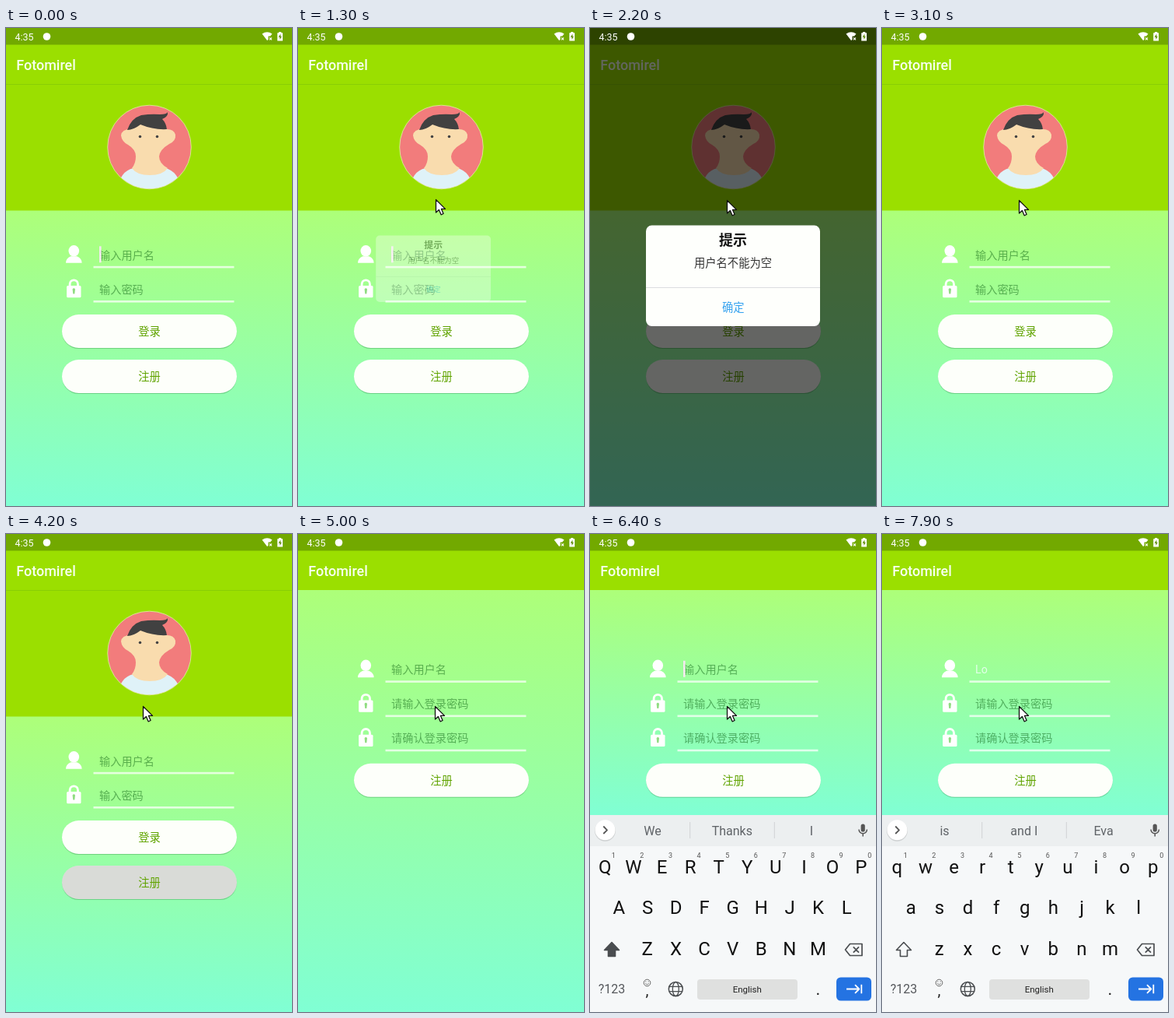
Recreate the animation shown at these times as an HTML page. Size 368 by 614 pixels, loop 8 s.

```html
<!DOCTYPE html>
<html lang="zh-CN">
<head>
<meta charset="utf-8">
<title>登录与注册</title>
<style>
  html, body { margin: 0; width: 100%; height: 100%; overflow: hidden; background: #9bdf00; }
  svg { display: block; width: 368px; height: 614px; }
  text { font-family: Roboto, "Noto Sans CJK SC", "Noto Sans CJK", sans-serif; }
  .hint { font-size: 14.2px; font-weight: 300; fill: #005208; opacity: .46; }
  .action { font-size: 14.3px; font-weight: 500; fill: #60a400; text-anchor: middle; }
  .mid { text-anchor: middle; }
  .key { font-size: 24px; fill: #111; text-anchor: middle; }
  .digit { font-size: 9px; fill: #555; text-anchor: middle; }
  .word { font-size: 16px; fill: #5f6367; text-anchor: middle; }
</style>
</head>
<body>
<svg id="stage" viewBox="0 0 368 614"></svg>
<script>
const LOOP = 8000, STEP = 100;
const ROWS = ["qwertyuiop", "asdfghjkl", "zxcvbnm"];
const ROW_X = [19.3, 37.4, 73.8], ROW_Y = [435.5, 488.3, 541], KEY_STEP = 36.6;

const text = (x, y, s, attrs = "") => `<text x="${x}" y="${y}" ${attrs}>${s}</text>`;
const rect = (x, y, w, h, fill, attrs = "") =>
  `<rect x="${x}" y="${y}" width="${w}" height="${h}" fill="${fill}" ${attrs}/>`;
const line = (d, color, width = 1.6) =>
  `<path d="${d}" fill="none" stroke="${color}" stroke-width="${width}" stroke-linejoin="round"/>`;

const userIcon = `<g fill="#fff"><ellipse cx="0" cy="-4.5" rx="6.8" ry="7.2"/>
  <path d="M-10.3 11Q-10.3 5-4 2.4H4Q10.3 5 10.3 11Z"/></g>`;
const lockIcon = `<path d="M-5.2-3V-6A5.2 5.2 0 0 1 5.2-6V-3" fill="none" stroke="#fff" stroke-width="2.8"/>
  ${rect(-9.2, -4, 18.4, 15.2, "#fff", 'rx="1.5"')}
  <path d="M-1.6 1.5A1.7 1.7 0 1 1 1.6 1.5L1 6.5H-1Z" fill="#8fdc80"/>`;

const field = (y, icon, hint, id) => `
  <g transform="translate(87.3 ${y - .5})">${icon}</g>
  ${text(120, y + 5.2, hint, `class="hint" id="${id}Hint"`)}
  ${rect(112.5, y + 14.5, 181, 2.6, "#fff", 'opacity=".72"')}
  ${rect(120, y - 11, 2.6, 21, "#f3e9ee", `id="${id}Caret"`)}`;

const button = (y, label, id = "") => `
  ${rect(72.3, y - 20, 224.5, 42.5, "#2f8a40", 'rx="21" opacity=".38"')}
  ${rect(72, y - 21.5, 225, 43, "#fdfffa", 'rx="21.5"')}
  ${id && rect(72, y - 21.5, 225, 43, "#000", `rx="21.5" opacity="0" id="${id}"`)}
  ${text(184.5, y + 5.2, label, 'class="action"')}`;

const avatar = `<clipPath id="disc"><circle cx="184.5" cy="153" r="53.5"/></clipPath>
  <g clip-path="url(#disc)">
    ${rect(130, 98, 110, 110, "#f27c7c")}
    <path d="M144 208Q146 184 164 180H205Q222 184 226 208Z" fill="#dff2f8"/>
    <path d="M160 130Q149 130 148 138Q149 146 157 150Q167 156 167 165Q167 174 162 180Q168 189 185 189
      Q202 189 208 180Q197 174 197 165Q198 156 210 149Q219 145 218 137Q216 130 207 130Q201 118 183 118Q166 118 160 130Z" fill="#f9dcae"/>
    <path d="M156 131Q161 116 174 112Q187 110 198 111Q207 111 208 108Q209 114 201 117Q206 122 207 130Q190 131 173 124Q164 131 156 131Z" fill="#414141"/>
    <circle cx="172.5" cy="139.5" r="1.8" fill="#444"/><circle cx="194.5" cy="139.5" r="1.8" fill="#444"/>
  </g><circle cx="184.5" cy="153" r="53.8" fill="none" stroke="#e8f4b8" stroke-width=".9" opacity=".8"/>`;

const statusItems = `
  ${text(11.5, 15.7, "4:35", 'font-size="12.4" fill="#fff"')}
  <circle cx="52.5" cy="11" r="4.8" fill="#fff"/>
  <path d="M329.5 7.5Q336 3 342.5 7.5L340 10.5H337.5V15L336 16Z" fill="#fff"/>
  ${line("M339 12.3L342 15.3M342 12.3L339 15.3", "#fff", 1.1)}
  <path d="M349.2 6.2H351V5H354.2V6.2H356V16.6H349.2Z" fill="#fff"/>
  <path d="M353.4 7.6L350.6 11.8H352.4V15L354.8 10.8H353.2Z" fill="#5a8a00"/>`;

const dialog = `
  ${rect(72, 253.5, 224, 129.5, "#fefffc", 'rx="7.5"')}
  ${text(184, 279, "提示", 'class="mid" font-size="18" font-weight="700" fill="#111"')}
  ${text(184, 307.3, "用户名不能为空", 'class="mid" font-size="14.3" fill="#333"')}
  ${rect(72, 333, 224, 1, "#dcdde0")}
  ${text(184.3, 363.5, "确定", 'class="mid" font-size="14.3" fill="#35a2ef"')}`;

const keys = ROWS.map((row, r) => [...row].map((c, i) => {
  const x = ROW_X[r] + i * KEY_STEP;
  return text(x, ROW_Y[r], c, 'class="key letter"') +
    (r ? "" : text(x + 11, 416, (i + 1) % 10, 'class="digit"'));
}).join("")).join("");

const keyboard = `
  ${rect(0, 361, 368, 253, "#f6f8f9")}${rect(0, 361, 368, 40, "#eceff0")}
  <circle cx="19.5" cy="381.3" r="13.4" fill="#000" opacity=".13"/>
  <circle cx="19.5" cy="380.3" r="13" fill="#fff"/>
  ${line("M17.3 375.5L22 380.3 17.3 385", "#555", 1.8)}
  ${rect(128.2, 370, 1, 21, "#cfd2d4")}${rect(236.8, 370, 1, 21, "#cfd2d4")}
  <g id="words">${[80.5, 182.8, 285].map(x => text(x, 386.6, "", 'class="word"')).join("")}</g>
  ${rect(348.6, 372.5, 5.2, 10, "#555", 'rx="2.6"')}
  ${line("M346 379.5A5.2 5.2 0 0 0 356.4 379.5M351.2 385V388.5", "#555", 1.5)}
  ${keys}
  <path id="shift" d="M28 524.5L37.5 534.5H32.5V542.5H23.5V534.5H18.5Z" stroke="#4a4d50" stroke-width="1.6" stroke-linejoin="round"/>
  ${line("M328.5 534L334.5 526.5H350V541.5H334.5ZM338.8 530.3L346 537.7M346 530.3L338.8 537.7", "#4a4d50", 1.7)}
  ${text(28, 590, "?123", 'class="mid" font-size="16" fill="#55585c"')}
  <circle cx="73.5" cy="576.5" r="4.3" fill="none" stroke="#666"/>
  ${line("M71.2 577.5Q73.5 580 75.8 577.5M71.8 574.3V575.6M75.2 574.3V575.6", "#666", .9)}
  ${text(73.5, 593, ",", 'class="mid" font-size="20" fill="#222"')}
  <circle cx="110.3" cy="584.5" r="9" fill="none" stroke="#4a4d50" stroke-width="1.5"/>
  <ellipse cx="110.3" cy="584.5" rx="4" ry="9" fill="none" stroke="#4a4d50" stroke-width="1.3"/>
  ${line("M102 581.3H118.6M102 587.7H118.6", "#4a4d50", 1.3)}
  ${rect(138, 572, 129, 26, "#dfe0df", 'rx="4"')}
  ${text(202.3, 589.3, "English", 'class="mid" font-size="11.5" fill="#222"')}
  ${text(293.5, 592, ".", 'class="mid" font-size="22" fill="#222"')}
  ${rect(317, 569.5, 45, 30, "#2473e2", 'rx="5.5"')}
  ${line("M330 584.5H346M341 579.2L346.3 584.5 341 589.8M349.3 578.7V590.2", "#fff", 1.8)}
  <g id="popup">${rect(-18, -88, 36, 49, "#d5d8da", 'rx="5"')}${rect(-18, -89, 36, 49, "#fff", 'rx="5"')}
    ${text(0, -56, "", 'class="key"')}</g>`;

document.getElementById("stage").innerHTML = `
  <defs><linearGradient id="sky" x2="0" y2="1">
    <stop stop-color="#adff79"/><stop offset="1" stop-color="#80ffd4"/></linearGradient></defs>
  ${rect(0, 0, 368, 614, "#9bdf00")}
  <g id="login">
    ${rect(0, 72, 368, 1, "#79bd0a", 'opacity=".5"')}
    ${rect(0, 234.5, 368, 379.5, "url(#sky)")}
    ${avatar}
    ${field(291.3, userIcon, "输入用户名", "name")}
    ${field(335.5, lockIcon, "输入密码", "pass")}
    ${button(389.5, "登录")}${button(447.5, "注册", "press")}
  </g>
  <g id="register">
    ${rect(0, 72, 368, 542, "url(#sky)", 'id="registerSky"')}
    ${field(173.8, userIcon, "输入用户名", "newName")}
    ${text(120, 179.2, "", 'id="typed" font-size="14.2" fill="#e2ffe9"')}
    ${field(218, lockIcon, "请输入登录密码", "newPass")}
    ${field(262.2, lockIcon, "请确认登录密码", "confirm")}
    ${button(316.3, "注册")}
  </g>
  ${rect(0, 0, 368, 21.5, "#72a900")}
  ${text(13.2, 54, "Fotomirel", 'font-size="18" font-weight="500" fill="#f8fff0"')}
  <g id="keyboard">${keyboard}</g>
  ${rect(0, 0, 368, 614, "#000", 'id="dim"')}
  ${statusItems}
  <g id="dialog">${dialog}</g>
  <path id="pointer" d="M0 0V16.6L3.9 13 6.6 19.3 9.6 18 7 11.9H12Z" fill="#fff" stroke="#111" stroke-width="1.3" stroke-linejoin="round"/>`;

const el = id => document.getElementById(id);
const set = (id, attr, value) => el(id).setAttribute(attr, value);
const show = (id, on) => set(id, "visibility", on ? "visible" : "hidden");
const letters = [...document.querySelectorAll(".letter")];
const words = [...el("words").children];

// Linear interpolation through [time, value] pairs.
function track(t, points) {
  if (t <= points[0][0]) return points[0][1];
  for (let i = 1; i < points.length; i++) {
    const [t0, v0] = points[i - 1], [t1, v1] = points[i];
    if (t < t1) return v0 + (v1 - v0) * (t - t0) / (t1 - t0);
  }
  return points[points.length - 1][1];
}
const within = (t, spans) => spans.some(([a, b]) => t >= a && t < b);

const DIM = [[1400, 0], [1600, .2], [2000, .605], [2500, .605], [3100, 0]];
const SCALE = [[1300, .66], [1600, .81], [2000, 1], [2500, 1], [2800, .8]];
const FADE = [[1200, 0], [1500, 1], [2500, 1], [2800, 0]];
const PRESS = [[4000, 0], [4200, .14], [4400, 0]];
const PAGE = [[4200, 0], [4400, 1]];
const SLIDE = [[5000, 253], [5400, 0]];

function render(t) {
  set("dim", "opacity", track(t, DIM));
  const s = track(t, SCALE);
  set("dialog", "transform", `translate(155 292) scale(${s}) translate(-155 -292)`);
  set("dialog", "opacity", track(t, FADE));
  show("pointer", t >= 1300);
  set("pointer", "transform", t < 2100 ? "translate(177.5 220.5)" : "translate(176.5 221.5)");

  set("press", "opacity", track(t, PRESS));
  set("register", "opacity", track(t, PAGE));
  const slide = track(t, SLIDE);
  set("keyboard", "transform", `translate(0 ${slide})`);
  set("registerSky", "height", 289 + slide);

  show("nameCaret", within(t, [[0, 400], [900, 1400], [3600, 4100]]));
  show("newNameCaret", within(t, [[4400, 4700], [5200, 5700], [6200, 7100], [7600, 7900]]));
  for (const id of ["pass", "newPass", "confirm"]) show(id + "Caret", false);

  const typed = t < 6600 ? "" : t < 7600 ? "L" : "Lo";
  el("typed").textContent = typed;
  show("newNameHint", !typed);
  set("newNameCaret", "x", 120 + [0, 8.5, 16.5][typed.length]);

  const chars = ROWS.join("");
  letters.forEach((node, i) => node.textContent = typed ? chars[i] : chars[i].toUpperCase());
  set("shift", "fill", typed ? "none" : "#4a4d50");
  const list = typed ? ["is", "and I", "Eva"] : ["We", "Thanks", "I"];
  words.forEach((node, i) => node.textContent = t < 5700 ? "" : list[i]);

  const key = within(t, [[6500, 6700]]) ? "L" : within(t, [[7500, 7700]]) ? "o" : "";
  show("popup", key);
  set("popup", "transform", key === "L" ? "translate(330 525)" : "translate(312 472)");
  el("popup").lastElementChild.textContent = key;
}

const start = performance.now();
function tick() {
  const t = (performance.now() - start) % LOOP;
  render(Math.floor(t / STEP) * STEP);
  requestAnimationFrame(tick);
}
tick();
</script>
</body>
</html>
```
